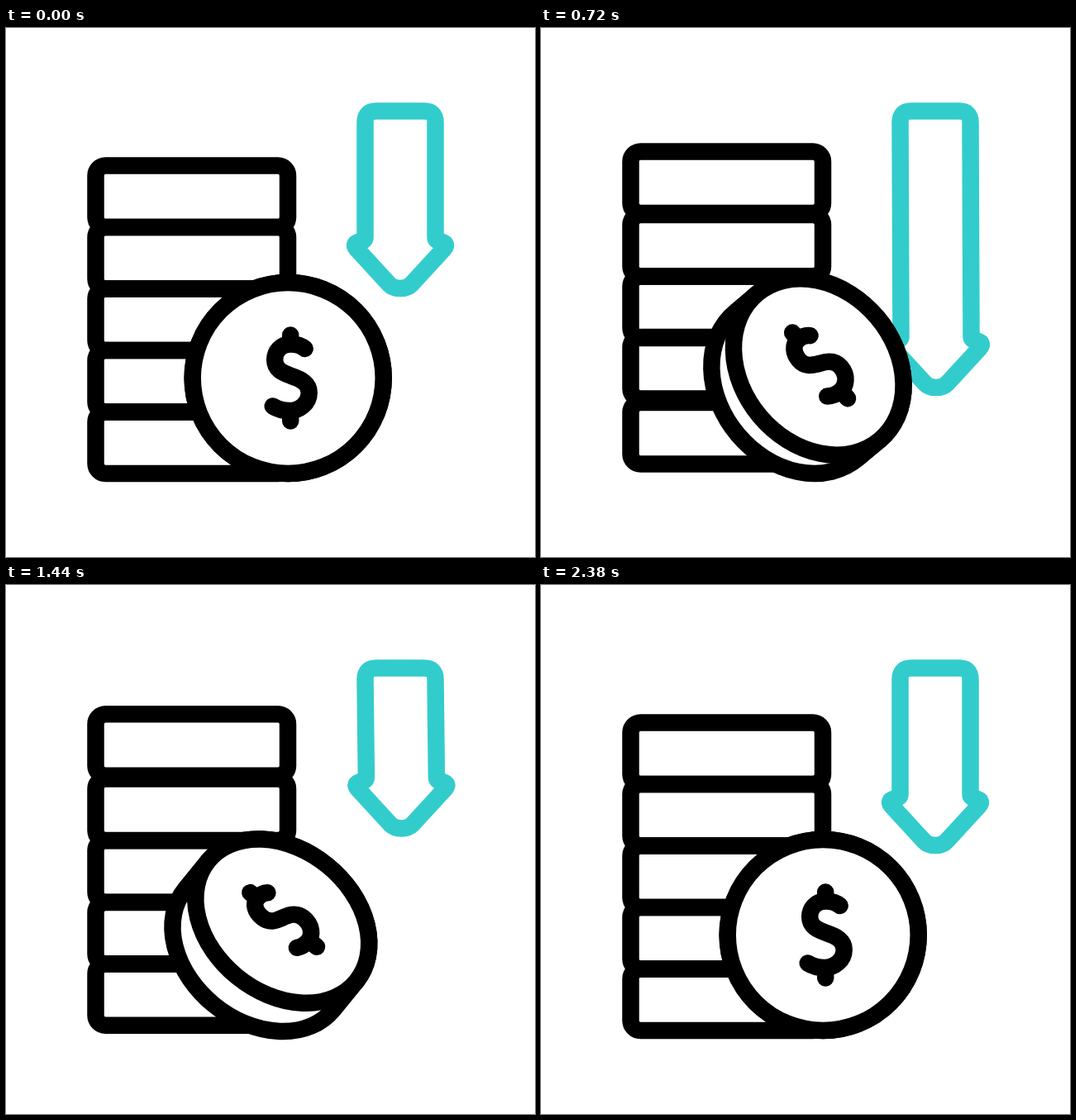
Animation, 640 px wide and 640 px high, one loop 2.4 s. Source, as an HTML page with a canvas:

```html
<!DOCTYPE html>
<html lang="en">
<head>
<meta charset="utf-8">
<title>Falling coins</title>
<style>
  html, body { margin: 0; width: 100%; height: 100%; overflow: hidden; background: #fff; }
  canvas { display: block; width: 100vmin; height: 100vmin; }
</style>
</head>
<body>
<canvas id="stage" width="640" height="640"></canvas>
<script>
const ctx = document.getElementById('stage').getContext('2d');
const LOOP = 2400;
const INK = '#000', TEAL = '#33cccc';
const LINE = 20.5, RADIUS = 115.5;

const smooth = x => x * x * (3 - 2 * x);

// Cubic Bezier (2/3, 0, 1/3, 1), solved by bisection.
function strongEase(x) {
  let lo = 0, hi = 1;
  for (let i = 0; i < 24; i++) {
    const s = (lo + hi) / 2;
    if (s * (2 - 3 * s + 2 * s * s) < x) lo = s; else hi = s;
  }
  return smooth(lo);
}

// Keys are [time, value, value, ...]; returns the eased values at t.
function track(keys, t, ease) {
  const last = keys[keys.length - 1];
  if (t >= last[0]) return last.slice(1);
  const i = keys.findIndex(key => key[0] > t);
  const a = keys[i - 1], b = keys[i];
  const p = ease((t - a[0]) / (b[0] - a[0]));
  return a.slice(1).map((v, j) => v + (b[j + 1] - v) * p);
}

// Lift of each box, top to bottom.
const LIFT = [
  [0, 0, 0, 0, 0, 0],
  [412, 109, 97.5, 76.5, 47, 14.2],
  [722, 17, 15, 15, 16, 11.5],
  [1052, 125, 102, 76, 47, 20.5],
  [1395, 7.5, 4, 4.5, 5, 6],
  [1725, 62.7, 52.5, 38.5, 23, 9.5],
  [2080, 0, 0, 0, 0, 0]
];
const STRETCH = [[0, 0], [380, -71], [800, 127], [1500, -21.5], [1720, 0]];
const LEAN = [[0, 0], [380, 0], [720, 1], [1060, 0], [1440, 1.4], [1720, 0]];

function stroke(color) {
  ctx.strokeStyle = color;
  ctx.stroke();
}

function drawStack(t) {
  track(LIFT, t, smooth).forEach((lift, i) => {
    ctx.beginPath();
    ctx.roundRect(108.5, 166.5 + 74.5 * i - lift, 232.5, 74.5, 12);
    stroke(INK);
  });
}

function drawArrow(t) {
  const [d] = track(STRETCH, t, strongEase);
  const [lean] = track(LEAN, t, smooth);
  const mid = 477;
  const X = (x, side) => mid + side * x + lean;
  const Y = y => y + d;
  ctx.beginPath();
  ctx.moveTo(mid, 100.5);
  ctx.lineTo(mid - 29, 100.5);
  ctx.quadraticCurveTo(mid - 42.5, 100.5, mid - 42.5, 114);
  ctx.lineTo(X(42.5, -1), Y(253));
  ctx.quadraticCurveTo(X(42.5, -1), Y(257.5), X(47, -1), Y(258));
  ctx.lineTo(X(50, -1), Y(258.5));
  ctx.quadraticCurveTo(X(58, -1), Y(261), X(53, -1), Y(267));
  ctx.lineTo(X(13.5, -1), Y(310));
  ctx.bezierCurveTo(X(7, -1), Y(316.7), X(7, 1), Y(316.7), X(13.5, 1), Y(310));
  ctx.lineTo(X(53, 1), Y(267));
  ctx.quadraticCurveTo(X(58, 1), Y(261), X(50, 1), Y(258.5));
  ctx.lineTo(X(47, 1), Y(258));
  ctx.quadraticCurveTo(X(42.5, 1), Y(257.5), X(42.5, 1), Y(253));
  ctx.lineTo(mid + 42.5, 114);
  ctx.quadraticCurveTo(mid + 42.5, 100.5, mid + 29, 100.5);
  ctx.closePath();
  stroke(TEAL);
}

// Dollar sign around the coin centre.
function dollarPath() {
  ctx.beginPath();
  ctx.moveTo(20.5, -35.5);
  ctx.bezierCurveTo(16, -39.5, 10, -41, 3.5, -41);
  ctx.bezierCurveTo(-9, -41, -16, -32, -16, -22);
  ctx.bezierCurveTo(-16, -10, -6, -6.5, 4, -2.5);
  ctx.bezierCurveTo(16, 1.5, 25.5, 6.5, 25.5, 17.5);
  ctx.bezierCurveTo(25.5, 31.5, 13, 39.5, 2, 39.5);
  ctx.bezierCurveTo(-7, 39.5, -13, 37.5, -18.5, 34);
  ctx.moveTo(3, -52);
  ctx.lineTo(3, -41);
  ctx.moveTo(3, 39.5);
  ctx.lineTo(3, 52);
}

function drawCoin(t) {
  const half = LOOP / 2;
  const tilt = strongEase(1 - Math.abs(t - half) / half);
  const squash = 1 - 0.26 * tilt;
  const depth = 46 * tilt;
  const rx = RADIUS * squash;

  ctx.save();
  ctx.translate(341.2 - 7.2 * tilt, 423.5 - 17.5 * Math.pow(tilt, 0.9));
  ctx.rotate(-53 * tilt * Math.PI / 180);
  ctx.fillStyle = '#fff';

  ctx.beginPath();
  ctx.ellipse(-depth, 0, rx, RADIUS, 0, Math.PI / 2, Math.PI * 1.5);
  ctx.ellipse(0, 0, rx, RADIUS, 0, -Math.PI / 2, Math.PI / 2);
  ctx.closePath();
  ctx.fill();
  stroke(INK);

  ctx.beginPath();
  ctx.ellipse(0, 0, rx, RADIUS, 0, 0, Math.PI * 2);
  ctx.fill();
  stroke(INK);

  // Squash the sign but keep its line width even.
  ctx.save();
  ctx.scale(squash, 1);
  dollarPath();
  ctx.restore();
  stroke(INK);
  ctx.restore();
}

function draw(now) {
  const t = now % LOOP;
  ctx.fillStyle = '#fff';
  ctx.fillRect(0, 0, 640, 640);
  ctx.lineWidth = LINE;
  ctx.lineCap = ctx.lineJoin = 'round';
  drawStack(t);
  drawArrow(t);
  drawCoin(t);
}

let start;
function frame(now) {
  start ??= now;
  draw(now - start);
  requestAnimationFrame(frame);
}
draw(0);
requestAnimationFrame(frame);
</script>
</body>
</html>
```
